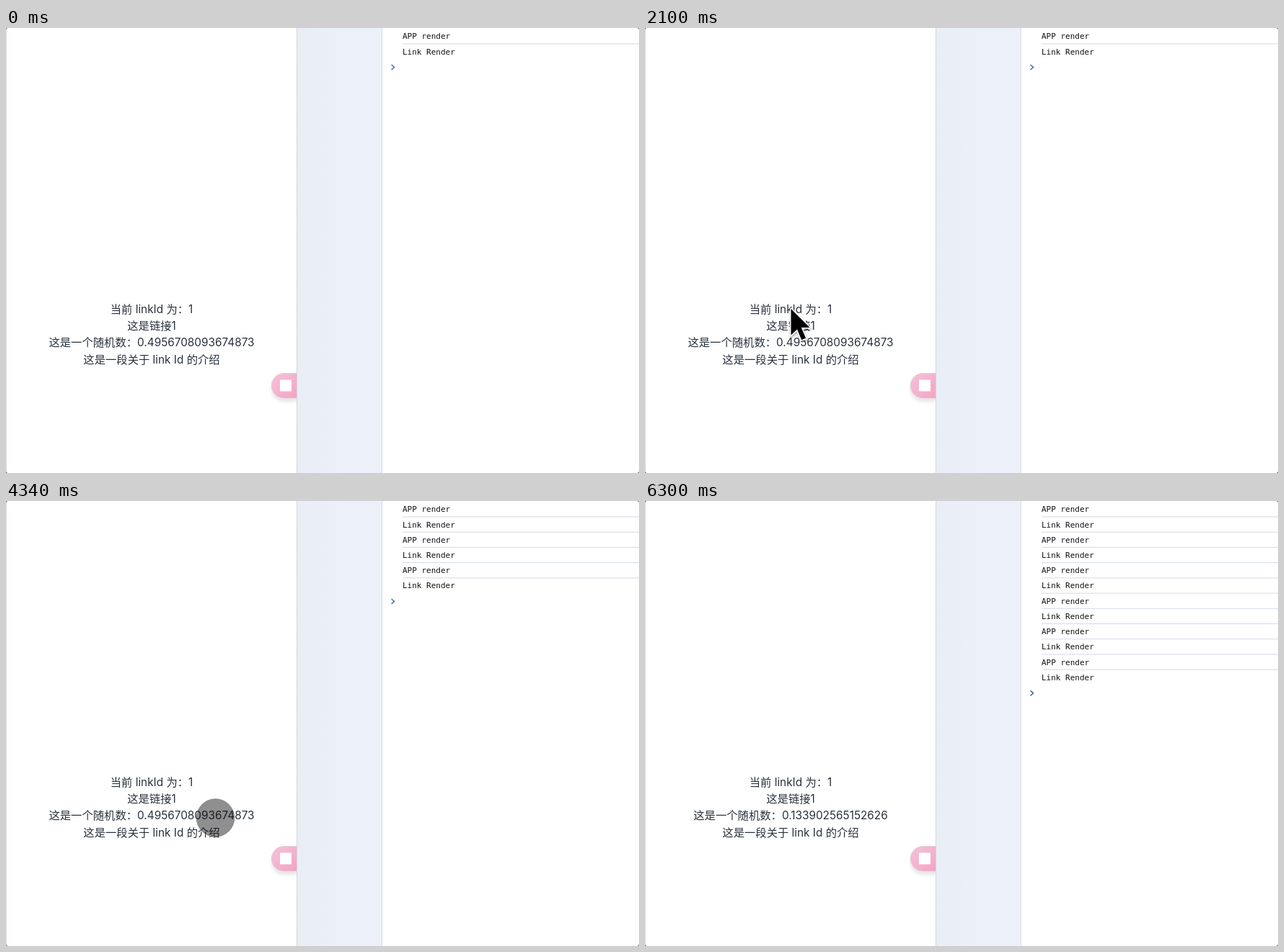
An HTML page that plays this animation: 878 by 618 pixels, repeating every 7.35 s.

```html
<!DOCTYPE html>
<html lang="zh-CN">
<head>
<meta charset="utf-8">
<title>Link render log</title>
<style>
  html, body { margin: 0; width: 100%; height: 100%; overflow: hidden; background: #fff; }
  svg { display: block; width: 878px; height: 618px; }
  .page { font: 15.33px Inter, "Noto Sans CJK SC", "Noto Sans CJK", sans-serif; fill: #2a323d; text-anchor: middle; }
  .log { font: 11px "DejaVu Sans Mono", monospace; fill: #111; }
</style>
</head>
<body>
<svg viewBox="0 0 878 618" xmlns="http://www.w3.org/2000/svg">
  <defs>
    <linearGradient id="strip"><stop offset="0" stop-color="#e9eef6"/><stop offset=".6" stop-color="#ebf0f9"/></linearGradient>
    <linearGradient id="pink" x2="1" y2="1"><stop offset="0" stop-color="#f6c3da"/><stop offset="1" stop-color="#f3a2c3"/></linearGradient>
    <filter id="soft" x="-40%" y="-40%" width="180%" height="190%"><feDropShadow dx="0" dy="4.5" stdDeviation="2" flood-opacity=".1"/></filter>
    <filter id="drop" x="-40%" y="-30%" width="200%" height="170%"><feDropShadow dx="0.5" dy="2" stdDeviation="1.6" flood-opacity=".4"/></filter>
    <clipPath id="left"><rect width="403" height="618"/></clipPath>
  </defs>

  <rect width="878" height="618" fill="#fff"/>
  <rect x="404" width="117" height="618" fill="url(#strip)"/>
  <path d="M.5 0V618M521.5 0V618" stroke="#d9dce5"/>
  <path d="M403.5 0V618" stroke="#d2d6dd"/>
  <path d="M0 0H3Q0 0 0 3ZM878 0V3Q878 0 875 0ZM0 618V615Q0 618 3 618ZM878 618H875Q878 618 878 615Z" fill="#555"/>

  <g class="page">
    <text id="current" x="202" y="395.8"/>
    <text id="link" x="202" y="419.1"/>
    <text id="random" x="202" y="442.4"/>
    <text x="202" y="465.7">这是一段关于 link Id 的介绍</text>
  </g>

  <g clip-path="url(#left)">
    <path d="M404 479.5H385.5a17.3 17.3 0 0 0 0 34.6H404Z" fill="url(#pink)" stroke="#dfccd6" stroke-width=".8" filter="url(#soft)"/>
  </g>
  <rect x="380" y="488.5" width="16" height="16" fill="#fff"/>

  <g id="log" class="log"></g>
  <path id="prompt" d="M534.6 -3.5L538.6 0L534.6 3.5" fill="none" stroke="#3b6db5" stroke-width="1.5"/>

  <path id="arrow" d="M0 0V36.5L8.5 28.5L14.7 43.2L20.6 40.7L14.3 26H26Z" fill="#000" stroke="#fff" stroke-width="2.8" stroke-linejoin="round" paint-order="stroke" filter="url(#drop)"/>
  <circle id="touch" cy="1.5" r="26.3" fill="#000" fill-opacity=".44" stroke="#666" stroke-opacity=".6"/>
</svg>

<script>
const LOOP = 7350, TICK = 70, ROW = 21.23;
const ENTER = 140, PRESS = 2590, LEAVE = 6300;
const clicks = [3010, 3850, 4830, 5460, 5950];
const randoms = ["0.4956708093674873", "0.3022184363973195", "0.6284059370648295", "0.133902565152626"];

const $ = id => document.getElementById(id);
const show = (node, on) => { node.style.display = on ? "" : "none"; };
const progress = (t, from, to) => Math.min(1, Math.max(0, (t - from) / (to - from)));
const smooth = k => k * k * (3 - 2 * k);

// Pointer moves after its entry: start, end, dx, dy
const moves = [
  [840, 1120, 3, 5],
  [1610, 1890, 1.5, -15],
  [2030, 2100, 1, -2],
  [4130, 4340, 88, 48.5],
  [4550, 4620, 3, -1],
  [6160, 6230, 90, 70]
];

function pointer(t) {
  // A decelerating arc up from the bottom edge
  const u = progress(t, ENTER, 840), rest = (1 - u) ** 3;
  let x = 197 + 30 * rest - 10 * Math.sin(Math.PI * u);
  let y = 402 + 190 * rest;
  for (const [from, to, dx, dy] of moves) {
    const k = smooth(progress(t, from, to));
    x += dx * k;
    y += dy * k;
  }
  return `translate(${x} ${y})`;
}

function add(parent, tag, attrs) {
  const node = document.createElementNS("http://www.w3.org/2000/svg", tag);
  for (const key in attrs) node.setAttribute(key, attrs[key]);
  parent.append(node);
  return node;
}

const rows = Array.from({ length: 2 * (clicks.length + 1) }, (_, i) => {
  const row = add($("log"), "g", {}), y = ROW * i;
  if (i) add(row, "rect", { x: 550, y: y + 0.2, width: 328, height: 1, fill: "#d3dae7" });
  add(row, "text", { x: 550, y: y + 15.3 }).textContent = i % 2 ? "Link Render" : "APP render";
  return row;
});

let shown;
function showRenders(count) {
  if (count === shown) return;
  shown = count;
  const id = count === 2 ? 2 : 1;
  $("current").textContent = `当前 linkId 为：${id}`;
  $("link").textContent = `这是链接${id}`;
  $("random").textContent = `这是一个随机数：${randoms[Math.max(0, count - 3)]}`;
  rows.forEach((row, i) => show(row, i < count * 2));
  $("prompt").setAttribute("transform", `translate(0 ${12.1 + ROW * count * 2})`);
}

function draw(time) {
  const t = Math.floor((time % LOOP) / TICK) * TICK;
  showRenders(1 + clicks.filter(c => c <= t).length);
  show($("arrow"), t >= ENTER && t < PRESS);
  show($("touch"), t >= PRESS && t < LEAVE);
  const at = pointer(t);
  $("arrow").setAttribute("transform", at);
  $("touch").setAttribute("transform", at);
}

const start = performance.now();
function frame() {
  draw(performance.now() - start);
  requestAnimationFrame(frame);
}
frame();
</script>
</body>
</html>
```
